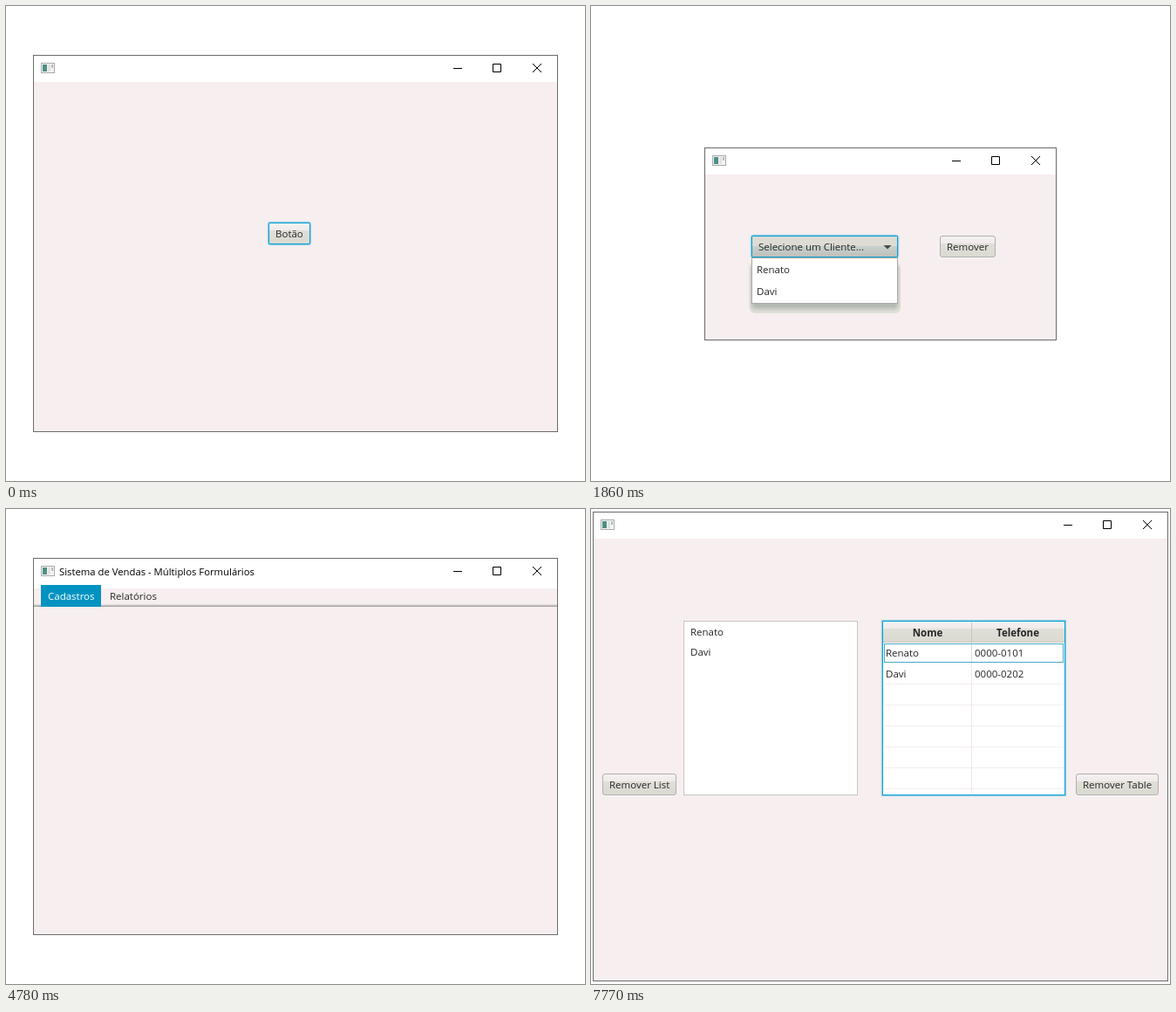
An HTML page for the animation above (8000 ms loop, 664 px wide and 544 px high).

```html
<!DOCTYPE html>
<html lang="pt">
<head>
<meta charset="utf-8">
<style>
html, body { margin: 0; width: 100%; height: 100%; overflow: hidden; background: #fff; }
svg { display: block; }
text { font: 11.5px "Open Sans", "Noto Sans", sans-serif; fill: #262626; white-space: pre; }
.title { font-size: 11.3px; fill: #000; }
.head { font-weight: bold; text-anchor: middle; }
.light { fill: #fff; }
.arial { font: 20px "Liberation Sans", sans-serif; }
.times { font: 15px "Liberation Serif", serif; }
</style>
</head>
<body>
<svg id="stage" width="664" height="544" viewBox="0 0 664 544">
  <defs>
    <linearGradient id="face" x2="0" y2="1">
      <stop stop-color="#f6f2f2"/><stop offset=".36" stop-color="#f0eae9"/>
      <stop offset=".36" stop-color="#e0dfd8"/><stop offset="1" stop-color="#dadad1"/>
    </linearGradient>
    <linearGradient id="pressed" x2="0" y2="1">
      <stop stop-color="#dcdbd5"/><stop offset=".5" stop-color="#dedcd4"/>
      <stop offset=".5" stop-color="#c8d0cc"/><stop offset="1" stop-color="#bfc0ba"/>
    </linearGradient>
    <linearGradient id="green" x2="0" y2="1">
      <stop stop-color="#a5da78"/><stop offset=".5" stop-color="#4fa82c"/><stop offset="1" stop-color="#93d35c"/>
    </linearGradient>
    <linearGradient id="red" x2="0" y2="1">
      <stop stop-color="#e25650"/><stop offset="1" stop-color="#b3100f"/>
    </linearGradient>
    <linearGradient id="paper" x2="1" y2="1">
      <stop stop-color="#a9cdf5"/><stop offset=".8" stop-color="#fff"/>
    </linearGradient>
    <filter id="blur"><feGaussianBlur stdDeviation="2"/></filter>
  </defs>
</svg>
<script>
const BLUE = '#039ed3', PINK = '#f7eeef', LOGO = '#0abcfa';
const NAMES = ['Renato', 'Davi'];

const rect = (x, y, w, h, fill, extra = '') =>
  `<rect x="${x}" y="${y}" width="${w}" height="${h}" fill="${fill}" ${extra}/>`;
const path = (d, fill, stroke = 'none', width = 1) =>
  `<path d="${d}" fill="${fill}" stroke="${stroke}" stroke-width="${width}"/>`;
const text = (x, y, s, cls = '') => `<text x="${x}" y="${y}" class="${cls}">${s}</text>`;

// Box whose line lies inside the given bounds
const box = (x, y, w, h, fill, line, size = 1, r = 0) =>
  rect(x + size / 2, y + size / 2, w - size, h - size, fill,
    `stroke="${line}" stroke-width="${size}" rx="${r}"`);

// Faint halo, blue edge and face, stacked from the outside in
const focusBox = (x, y, w, h, fill, r = 2) =>
  [[1.4, BLUE + '33'], [.2, BLUE], [-1, '#fff'], [-1, fill]].map(([out, color]) =>
    rect(x - out, y - out, w + 2 * out, h + 2 * out, color, `rx="${r && r + out}"`)).join('');

function button(x, y, w, h, focus) {
  if (focus) return focusBox(x, y, w, h, 'url(#face)');
  return rect(x, y + 1, w, h, '#fcf8f8', 'rx="3"') + box(x, y, w, h, 'url(#face)', '#b0b1b0', 1, 2.5);
}

const textButton = (x, y, w, label, focus) =>
  button(x, y, w, 25, focus) + text(x + 8, y + 17, label);

function windowFrame(x, y, w, h, title = '') {
  const r = x + w;
  return box(x, y, w, h, '#fff', '#6c6a6c') +
    rect(x + 1, y + 31, w - 2, h - 32, PINK) +
    box(x + 9, y + 9, 16, 12, '#f4f4f4', '#a9abab') +
    rect(x + 11, y + 11, 5, 8, '#4f8f86') +
    rect(x + 17, y + 11, 3, 8, '#dfe3e3') +
    rect(x + 21, y + 11, 2, 4, '#b5b9b9') +
    path(`M${r - 120} ${y + 15.5}h10M${r - 74.5} ${y + 10.5}h9v9h-9z` +
      `M${r - 29} ${y + 10}l10 10m0-10l-10 10`, 'none', '#000') +
    text(x + 30, y + 20, title, 'title');
}

const names = (x, y, step) => NAMES.map((n, i) => text(x, y + i * step, n)).join('');

function plusIcon() {
  return button(445, 369, 30, 30, true) +
    path('M456 371h9v9h9v9h-9v9h-9v-9h-9v-9h9z', 'url(#green)', '#4b9a2d') +
    path('M457.5 372.5h6v9h9', 'none', '#c3e8a2');
}

function editIcon() {
  return rect(483, 369, 30, 30, '#fff') +
    path('M484.5 370.5h22v27h-17l-5-5z', 'url(#paper)', '#6f7f94') +
    path('M484.5 392.5h5v5z', '#dfe8f2', '#44536a') +
    path('M489 392l2-7 4 4z', '#e9c58f', '#35302c', .8) +
    path('M491 385l13-13 5 4-14 13z', '#5662ae', '#25294f') +
    path('M494 386l12-12', 'none', '#9aa5dc', 1.5) +
    path('M504 372l3-2.5q5 0 6 4l-4 3z', '#b5502f', '#59281c') +
    path('M489 392l.8-2.6 1.8 1.6z', '#222');
}

function crossIcon() {
  return button(523, 369, 30, 30) +
    path('M528 371l10 8.5 9.5-8.5 4 4-9 9 9 9.5-4.5 4-9-9-9.5 9-4-4 9-9.5-9-9z', 'url(#red)', '#9c1713') +
    path('M528 373l10 9 9.5-8.5', 'none', '#ee8d87');
}

function table() {
  let s = focusBox(334, 128, 210, 200, '#fff', 0) + rect(335, 129, 208, 23, 'url(#face)');
  for (let y = 200.5; y < 325; y += 24) s += path(`M336 ${y}h206`, 'none', '#f4eded');
  return s + path('M436.5 153v173', 'none', '#efe8e8') +
    path('M436.5 130v22M335 152.5h208', 'none', '#c9c7c1') +
    box(336, 154, 206, 22, 'none', '#45abc6') +
    path('M436.5 155v20', 'none', '#d5dfe1') +
    text(386, 146, 'Nome', 'head') + text(489.5, 146, 'Telefone', 'head') +
    names(338, 169, 24) + text(440, 169, '0000-0101') + text(440, 193, '0000-0202');
}

const scenes = [
  [0, windowFrame(31, 56, 602, 432) + textButton(301, 248, 48, 'Botão', true)],

  [400, windowFrame(31, 56, 602, 432) +
    text(72, 198, 'Botão com Imagem via Código') +
    button(264, 181, 116, 108, true) + rect(272, 185, 100, 100, LOGO) +
    text(72, 380, 'Botão com Imagem via CSS') +
    rect(266, 363, 100, 101, '#000') + rect(267, 364, 98, 98, LOGO)],

  [1860, windowFrame(130, 162, 404, 221) +
    rect(182, 296, 173, 56, '#e0e0d8', 'rx="6"') +
    rect(184, 294, 168, 53, '#b4b9b0', 'rx="4" filter="url(#blur)"') +
    focusBox(184, 263, 168, 25, 'url(#pressed)') +
    text(192, 280, 'Selecione um Cliente...') +
    path('M335.5 274h9l-4.5 4.5z', '#4a4a4a') +
    box(184, 288, 168, 53, '#fff', '#aaa9a8') + names(190, 306, 25) +
    textButton(400, 263, 64, 'Remover')],

  [3320, windowFrame(31, 64, 602, 416) +
    box(66, 133, 34, 23, PINK, '#2600ff', 3) + text(69, 149, 'Label') +
    box(177, 135, 30, 19, PINK, '#e0101c') + text(178, 149, 'Label') +
    button(66, 250, 86, 37) + text(80, 276, 'Button', 'arial') +
    button(177, 256, 60, 26) + text(187, 274, 'Button', 'times') +
    rect(58, 357, 150, 25, '#ff0', 'rx="10"') + rect(58, 422, 150, 25, '#ff0', 'rx="4"') +
    plusIcon() + editIcon() + crossIcon()],

  [4780, windowFrame(31, 56, 602, 432, 'Sistema de Vendas - Múltiplos Formulários') +
    rect(32, 87, 600, 4, '#fff') + rect(32, 109, 600, 1, '#e2dada') +
    rect(32, 110, 600, 1, '#c9c3c3') + rect(32, 111, 600, 1, '#aaa4a5') +
    rect(40, 87, 69, 25, '#0093c1') +
    text(48, 104, 'Cadastros', 'light') + text(119, 104, 'Relatórios')],

  [6310, windowFrame(149, 134, 367, 277) +
    focusBox(164, 199, 200, 200, '#fff', 0) + names(172, 216, 23) +
    textButton(416, 199, 91, 'Remover Item')],

  [7770, windowFrame(2, 3, 660, 538) +
    box(106, 128, 200, 200, '#fff', '#c8c6c0') + names(114, 145, 23) +
    table() + textButton(13, 303, 85, 'Remover List') + textButton(556, 303, 95, 'Remover Table')]
];

const stage = document.getElementById('stage');
stage.insertAdjacentHTML('beforeend', scenes.map(([, s]) => `<g class="scene" display="none">${s}</g>`).join(''));
const groups = [...stage.querySelectorAll('.scene')];

let shown = -1;
function draw() {
  const t = performance.now() % 8000;
  const now = scenes.findLastIndex(([start]) => t >= start);
  if (now !== shown) {
    groups.forEach((g, i) => g.setAttribute('display', i === now ? 'inline' : 'none'));
    shown = now;
  }
  requestAnimationFrame(draw);
}
draw();
</script>
</body>
</html>
```
